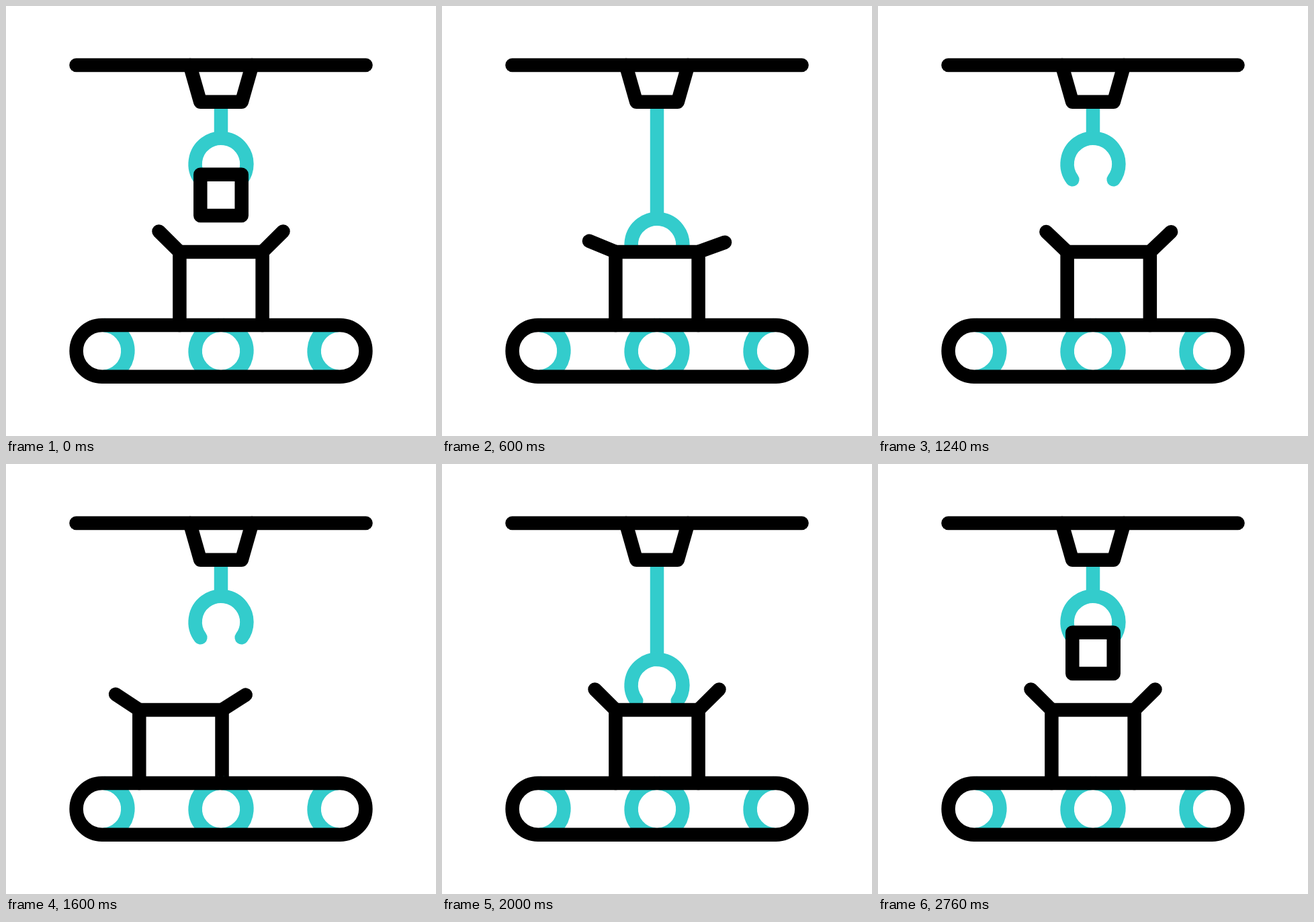
These frames come from a looping animation (640x640 px, 3000 ms). An HTML page with a canvas:

```html
<!DOCTYPE html>
<html lang="en">
<head>
<meta charset="utf-8">
<title>Packing line</title>
<style>
html, body { margin: 0; width: 100%; height: 100%; overflow: hidden; background: #fff; }
canvas { display: block; width: 640px; height: 640px; }
</style>
</head>
<body>
<canvas id="stage" width="640" height="640"></canvas>
<script>
const ctx = document.getElementById('stage').getContext('2d');
const LOOP = 3000, STEP = 40;
const BLACK = '#000', TEAL = '#33cccc';
const RADIUS = 38.4;

// Keys are [time, value] pairs, eased in and out between neighbours.
const CLAW_DROP = [[80, 0], [570, 120], [600, 120], [1010, 0], [1720, 0], [2120, 120], [2270, 120], [2760, 0]];
const BOX_SHIFT = [[600, 0], [960, 59], [1060, 59], [1560, -62], [1940, 0]];
const FLAP_OPEN = [[80, 0], [680, 1], [1320, 0], [1640, 0.5], [1960, 0]];

function valueAt(keys, t) {
  if (t <= keys[0][0]) return keys[0][1];
  for (let i = 1; i < keys.length; i++) {
    const [t0, v0] = keys[i - 1], [t1, v1] = keys[i];
    if (t < t1) {
      const p = (t - t0) / (t1 - t0);
      return v0 + (v1 - v0) * p * p * (3 - 2 * p);
    }
  }
  return keys[keys.length - 1][1];
}

function polyline(points, { color = BLACK, closed = false, filled = false } = {}) {
  ctx.beginPath();
  points.forEach(([x, y]) => ctx.lineTo(x, y));
  if (closed) ctx.closePath();
  if (filled) {
    ctx.fillStyle = '#fff';
    ctx.fill();
  }
  ctx.strokeStyle = color;
  ctx.stroke();
}

function arc(x, y, from, to, cap = 'round') {
  ctx.lineCap = cap;
  ctx.beginPath();
  ctx.arc(x, y, RADIUS, from, to);
  ctx.strokeStyle = TEAL;
  ctx.stroke();
  ctx.lineCap = 'round';
}

function drawClaw(drop, loaded) {
  const y = 235.2 + drop;
  polyline([[320, 143], [320, y - RADIUS]], { color: TEAL });
  arc(320, y, Math.PI - 0.645, 0.645);
  if (loaded) {
    const top = 250.7 + drop, bottom = 312 + drop;
    polyline([[289.3, top], [350.7, top], [350.7, bottom], [289.3, bottom]], { closed: true, filled: true });
  }
}

function drawCrane() {
  polyline([[273.6, 88], [289.2, 142.8], [350.8, 142.8], [366.4, 88]], { filled: true });
  polyline([[104.5, 88], [535.5, 88]]);
}

function drawBox(shift, open) {
  const left = 258.4 + shift, right = 381.6 + shift, top = 366;
  const reach = 30.9 + 9 * open;
  polyline([[left, 475], [left, top], [right, top], [right, 475]], { filled: true });
  polyline([[left, top], [left - reach, top - 30.6 + 15.2 * open]]);
  polyline([[right, top], [right + reach, top - 30.6 + 17.2 * open]]);
}

function drawBelt() {
  const y = 513.4, half = 1.5;
  const rightSide = x => arc(x, y, -half, half, 'butt');
  const leftSide = x => arc(x, y, Math.PI - half, Math.PI + half, 'butt');
  rightSide(143);
  rightSide(320);
  leftSide(320);
  leftSide(497);
  ctx.beginPath();
  ctx.arc(143, y, RADIUS, Math.PI / 2, -Math.PI / 2);
  ctx.arc(497, y, RADIUS, -Math.PI / 2, Math.PI / 2);
  ctx.closePath();
  ctx.strokeStyle = BLACK;
  ctx.stroke();
}

function draw(t) {
  ctx.fillStyle = '#fff';
  ctx.fillRect(0, 0, 640, 640);
  ctx.lineWidth = 20.5;
  ctx.lineCap = ctx.lineJoin = 'round';
  drawClaw(valueAt(CLAW_DROP, t), t <= 600 || t >= 2200);
  drawCrane();
  drawBox(valueAt(BOX_SHIFT, t), valueAt(FLAP_OPEN, t));
  drawBelt();
}

const start = performance.now();
function tick() {
  const t = (performance.now() - start) % LOOP;
  draw(Math.floor(t / STEP) * STEP);
  requestAnimationFrame(tick);
}
tick();
</script>
</body>
</html>
```
